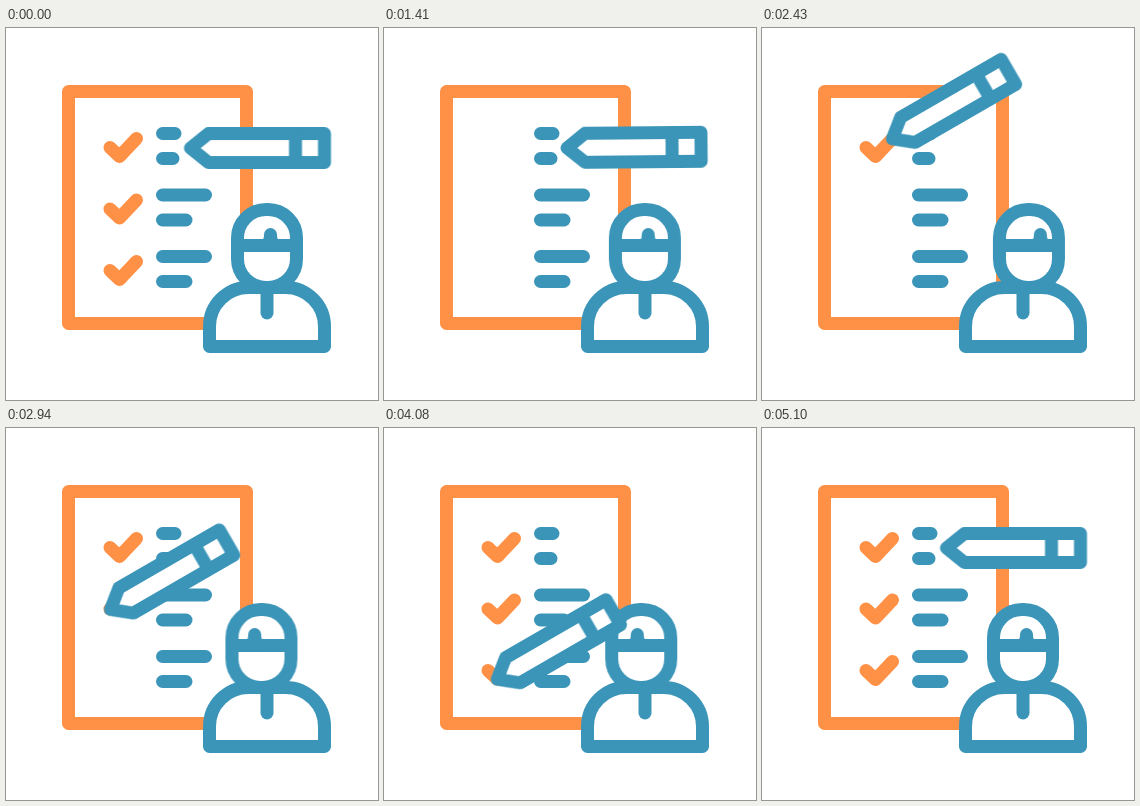
Write an HTML page without scripts that moves like this. It is 372 px wide and 372 px high and loops after 5.43 s.

```html
<!DOCTYPE html>
<html lang="en">
<head>
<meta charset="utf-8">
<title>Checklist</title>
<style>
  html, body { margin: 0; width: 100%; height: 100%; overflow: hidden; background: #fff; }
  svg {
    display: block; width: 100%; height: 100%;
    --blue: #3b95b8; --orange: #ff9147;
    fill: none; stroke: var(--blue); stroke-width: 13;
    stroke-linecap: round; stroke-linejoin: round;
  }
  .solid { fill: #fff; }
  .orange { stroke: var(--orange); }

  .old, .new, .line, .tick, .pencil, .head, .fringe {
    animation: 5430ms cubic-bezier(.333, 0, .667, 1) infinite;
  }

  /* The finished page scrolls off while a blank one follows it */
  .old { animation-name: scroll-out; }
  .new { animation-name: scroll-in; }
  @keyframes scroll-out { 13.63%, 100% { transform: translateY(-194.5px); } }
  @keyframes scroll-in { 0% { transform: translateY(194.5px); } 13.63%, 100% { transform: none; } }

  /* --len: line length, --start: moment it begins to grow */
  .lines path { stroke-dasharray: calc(var(--len) * 1px) 200px; }
  .line { animation-name: grow; animation-delay: calc((var(--start) - 5430) * 1ms); }
  @keyframes grow {
    0% { stroke-dasharray: .01px 200px; }
    4.42% { stroke-dasharray: calc(var(--len) * 1.45px) 200px; }
    8.84%, 92.27% { stroke-dasharray: calc(var(--len) * 1px) 200px; }
    92.28%, 100% { stroke-dasharray: .01px 200px; }
  }

  .tick { stroke-dasharray: 100 300; stroke-dashoffset: 102; }
  .t1 { animation-name: tick1; }
  .t2 { animation-name: tick2; }
  .t3 { animation-name: tick3; }
  @keyframes tick1 {
    0%, 34.81% { stroke-dashoffset: 102; } 37.48% { stroke-dashoffset: 65; } 44.38%, 100% { stroke-dashoffset: 0; }
  }
  @keyframes tick2 {
    0%, 53.78% { stroke-dashoffset: 102; } 56.45% { stroke-dashoffset: 65; } 63.35%, 100% { stroke-dashoffset: 0; }
  }
  @keyframes tick3 {
    0%, 72.74% { stroke-dashoffset: 102; } 75.41% { stroke-dashoffset: 65; } 82.32%, 100% { stroke-dashoffset: 0; }
  }

  /* The pencil's origin is its tip */
  .pencil { animation-name: write; }
  @keyframes write {
    0%, 25.23% { transform: translate(184.5px, 120px) rotate(0deg); }
    34.81% { transform: translate(104px, 119.5px) rotate(-30deg); }
    37.48% { transform: translate(113.5px, 128.5px) rotate(-30deg); }
    44.38% { transform: translate(130.5px, 110.5px) rotate(-30deg); }
    53.78% { transform: translate(104px, 181px) rotate(-30deg); }
    56.45% { transform: translate(113.5px, 190px) rotate(-30deg); }
    63.35% { transform: translate(130.5px, 172px) rotate(-30deg); }
    72.74% { transform: translate(104px, 242.5px) rotate(-30deg); }
    75.41% { transform: translate(113.5px, 251.5px) rotate(-30deg); }
    82.32% { transform: translate(130.5px, 233.5px) rotate(-30deg); }
    93.92%, 100% { transform: translate(184.5px, 120px) rotate(0deg); }
  }

  /* The head follows the pencil, the fringe moves further to suggest a turn */
  .head { --left: -5.6px; --right: 6px; animation-name: look; }
  .fringe { --left: -10.4px; --right: 8px; animation-name: look; }
  @keyframes look {
    0%, 25.23% { transform: none; }
    34.81%, 53.78%, 72.74% { transform: translateX(var(--left)); }
    44.38%, 63.35%, 82.32% { transform: translateX(var(--right)); }
    93.92%, 100% { transform: none; }
  }
</style>
</head>
<body>
<svg viewBox="0 0 372 372">
  <defs>
    <clipPath id="sheet"><rect x="63" y="63" width="178" height="232"/></clipPath>
    <path id="check" d="M104 119.5l9.5 9 17-18" pathLength="100"/>
  </defs>

  <rect class="solid" x="62.5" y="63.5" width="178" height="232" stroke="none"/>
  <g clip-path="url(#sheet)">
    <g class="old">
      <g class="lines">
        <path style="--len:12.5" d="M156.5 105.5h90"/>
        <path style="--len:10.5" d="M156.5 130.5h90"/>
        <path style="--len:43" d="M156.5 167h90"/>
        <path style="--len:23.5" d="M156.5 192h90"/>
        <path style="--len:43" d="M156.5 228.5h90"/>
        <path style="--len:23.5" d="M156.5 253.5h90"/>
      </g>
      <g class="orange">
        <use href="#check"/>
        <use href="#check" y="61.5"/>
        <use href="#check" y="123"/>
      </g>
    </g>
    <g class="new">
      <g class="lines">
        <path class="line" style="--len:12.5;--start:420" d="M156.5 105.5h90"/>
        <path class="line" style="--len:10.5;--start:435" d="M156.5 130.5h90"/>
        <path class="line" style="--len:43;--start:530" d="M156.5 167h90"/>
        <path class="line" style="--len:23.5;--start:566" d="M156.5 192h90"/>
        <path class="line" style="--len:43;--start:600" d="M156.5 228.5h90"/>
        <path class="line" style="--len:23.5;--start:612" d="M156.5 253.5h90"/>
      </g>
      <g class="orange">
        <use class="tick t1" href="#check"/>
        <use class="tick t2" href="#check" y="61.5"/>
        <use class="tick t3" href="#check" y="123"/>
      </g>
    </g>
  </g>
  <rect class="orange" x="62.5" y="63.5" width="178" height="232"/>

  <path class="solid" d="M203.5 318.5V298.500A39 39 0 0 1 242.500 259.500H279.500A39 39 0 0 1 318.500 298.500V318.500Z"/>
  <g class="head">
    <rect class="solid" x="231.500" y="181.500" width="59" height="78" rx="28.500"/>
    <path d="M231.500 217.500H290.500"/>
    <path class="fringe" d="M257 217.500Q264.500 217.500 264.500 206.500Q264.500 217.500 272 217.500"/>
  </g>
  <path d="M261 260V285"/>

  <g class="pencil">
    <path class="solid" d="M0 0L18 -14.500H134V14.500H18Z"/>
    <path d="M105 -14.500V14.500"/>
  </g>
</svg>
</body>
</html>
```
